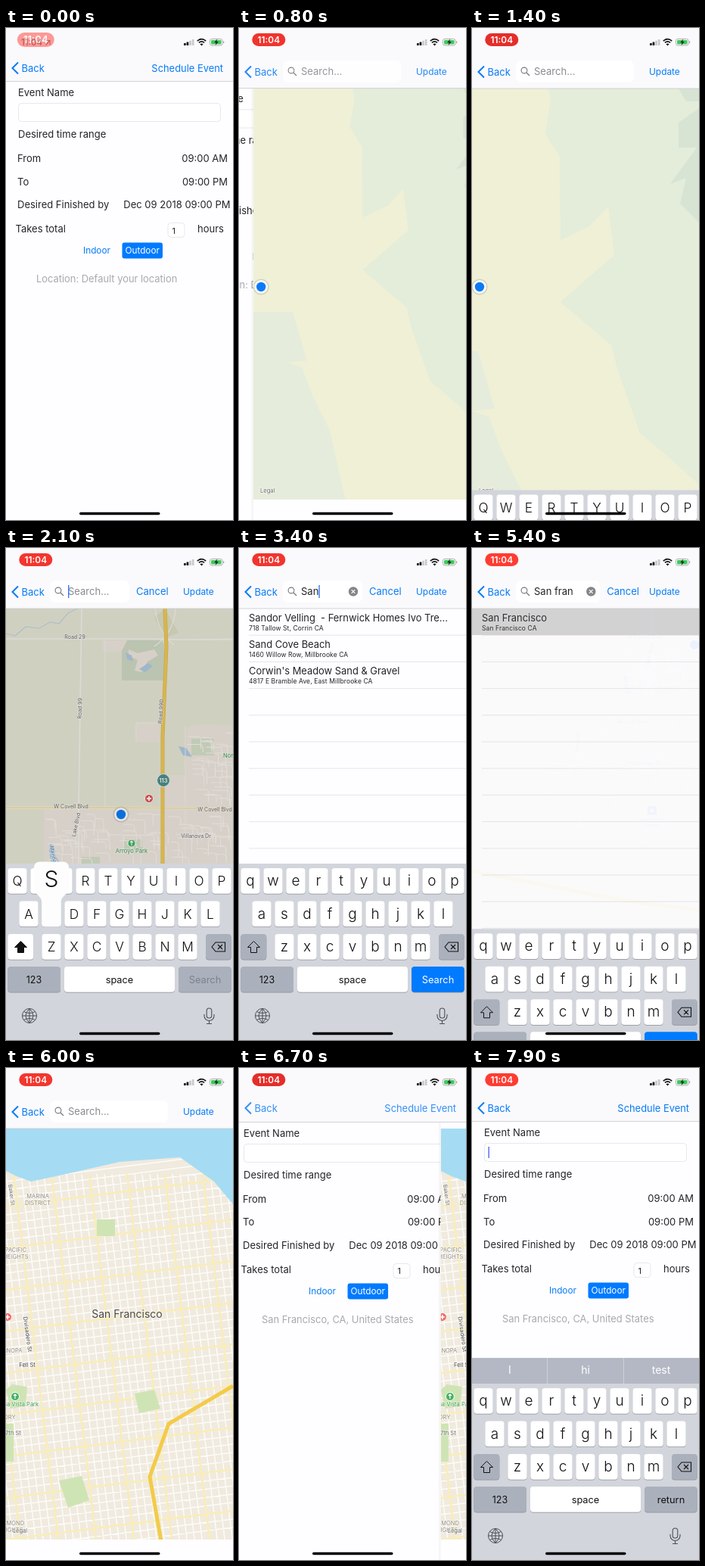
Animation of 300 by 650 pixels, one loop 8000 ms. Source, as an HTML page:

```html
<!DOCTYPE html>
<html lang="en">
<head>
<meta charset="utf-8">
<title>Schedule event</title>
<style>
  html, body { margin: 0; width: 100%; height: 100%; overflow: hidden; background: #fff; }
  svg { display: block; width: 300px; height: 650px; }
  text { font-family: Inter, Roboto, sans-serif; white-space: pre; }
</style>
</head>
<body>
<svg id="stage" viewBox="0 0 300 650" xmlns="http://www.w3.org/2000/svg"></svg>
<script>
const LOOP = 8000, STEP = 100;
const BLUE = '#087cf5', INK = '#242426';

// ---- markup helpers ----
const text = (x, y, s, size = 13, fill = INK, more = '') =>
  `<text x="${x}" y="${y}" font-size="${size}" fill="${fill}" ${more}>${s}</text>`;
const rect = (x, y, w, h, fill, r = 0, more = '') =>
  `<rect x="${x}" y="${y}" width="${w}" height="${h}" fill="${fill}" rx="${r}" ${more}/>`;
const line = (d, stroke, w = 1, more = '') =>
  `<path d="${d}" fill="none" stroke="${stroke}" stroke-width="${w}" ${more}/>`;
const area = (d, fill) => `<path d="${d}" fill="${fill}"/>`;
const disc = (x, y, r, fill, more = '') => `<circle cx="${x}" cy="${y}" r="${r}" fill="${fill}" ${more}/>`;
const group = (id, body, more = '') => `<g id="${id}" ${more}>${body}</g>`;
const END = 'text-anchor="end"', MID = 'text-anchor="middle"';
const label = (x, y, s, size = 7, turn = 0, fill = '#6d6a68') =>
  text(0, 0, s, size, fill, `${MID} stroke="#fff" stroke-opacity=".6" stroke-width="1.5" paint-order="stroke" transform="translate(${x} ${y}) rotate(${turn})"`);

function seeded(n) {
  return () => (n = (n * 16807) % 2147483647) / 2147483647;
}

// ---- form ----
function formMarkup() {
  const box = (x, y, w, h) => rect(x, y, w, h, '#fff', 4, 'stroke="#e8e7ec"');
  return rect(-20, -20, 420, 690, '#fefdff') +
    text(16, 90, 'Event Name') + box(16.5, 99.5, 267, 24) +
    rect(21.5, 104, 1.4, 15, '#4a6fe0', 0, 'id="fieldCaret"') +
    text(16, 145, 'Desired time range') +
    text(15, 177, 'From') + text(293, 177, '09:00 AM', 13, INK, END) +
    text(15, 207.5, 'To') + text(293, 207.5, '09:00 PM', 13, INK, END) +
    text(15, 238, 'Desired Finished by') + text(296.5, 238, 'Dec 09 2018 09:00 PM', 13, INK, END) +
    text(12.5, 270, 'Takes total') + box(214, 257.5, 22, 19) +
    text(219.5, 271.5, '1', 11) + text(253, 270, 'hours') +
    text(102, 298, 'Indoor', 11.8, BLUE) + rect(153.5, 283.5, 53.5, 21, '#007aff', 3) +
    text(180.2, 298, 'Outdoor', 11.8, '#fff', MID) +
    text(40, 336, '', 12.9, '#a9a9ad', 'id="place"');
}

// ---- maps ----
function plainMap() {
  return rect(-300, -100, 900, 1000, '#eff0d6') +
    area('M101 80L104 95L97 140L116 170L117 280L155 262L180 236L188 300L117 362L185 420L192 450L222 535L246 555L300 603L500 720V40H101Z', '#e4ecda') +
    area('M273 80L283 97H500V40H273ZM300 106L273 125V158H297L262 206L283 198L275 232L300 257H500V106Z', '#d8e4d3') +
    area('M-200 427H8L30 503L0 506L22 513L40 560L66 612L90 720H-200Z', '#e6ecdc');
}

function townStreets(seed, n, x, y, w, h) {
  const rnd = seeded(seed);
  let d = '';
  for (let i = 0; i < n; i++) {
    const a = x + rnd() * w, b = y + rnd() * h, u = 6 + rnd() * 14, v = 5 + rnd() * 12;
    d += `M${a.toFixed(1)} ${b.toFixed(1)}h${u.toFixed(1)}q4 0 4 4v${v.toFixed(1)}`;
  }
  return line(d, '#faf6f1', 1);
}

function fieldsMap() {
  const town = '#efe7df', road = '#f6f4ee';
  const highway = 'M210 -400V80L212 130L207 250V700';
  return rect(-700, -500, 1700, 1700, '#e8e7d7') +
    area('M128 122H166V137H128ZM172 231H203V256H172ZM240 237L262 233L300 235V417H50V345H203V300H237Z', town) +
    rect(-60, 430, 230, 190, town) +
    area('M153 136L160 122H206L209 128V175H153Z', '#d0dac4') +
    area('M196 92L210 80L228 112L210 119Z', '#dcdfc4') +
    area('M162 134l12 5l22 -5l5 8l-14 8l-8 14l-9 -2l4 -14l-12 -6z', town) +
    area('M158 138l8 4l2 8l-8 -3zM176 160l12 -8l6 4l-10 8zM228 262l10 2l8 12l-12 -2zM58 390l5 4l3 14l6 9h-12l-3 -16z', '#b0cce2') +
    area('M245 252h30v22h-30zM155 385h25v14h-25zM100 408h24v9h-24z', '#d7e1c9') +
    townStreets(77, 50, 52, 350, 145, 62) + townStreets(31, 28, 215, 350, 70, 60) +
    townStreets(9, 34, 239, 243, 52, 90) + townStreets(5, 40, -55, 435, 200, 170) +
    line('M-60 116L0 113L12 116L26 104L44 106L58 98L70 100L82 86L95 80', '#bfd5e2', 1.2) +
    line('M-300 120H195L230 121L600 119M100 80L96 345V417', road, 1.6) +
    line('M131 120V345M172 256V231H203M237 235V417', road, 0.8) +
    line('M-300 343H110L600 346', '#faf3d6', 3.4) + line('M-300 343H110L600 346', '#f0e3b4', 1.8) +
    line('M197 80Q201 112 222 128M224 80Q222 112 196 130', road, 1.2) +
    line(highway, '#dcb950', 5) + line(highway, '#f2cb55', 3.6) +
    line('M-300 620L60 690L300 720', '#f3cb48', 5) +
    label(91, 120, 'Road 29') + label(100, 212, 'Road 99', 7, -88) + label(207, 216, 'Road 99D', 7, -86) +
    label(86, 344, 'W Covell Blvd') + label(276, 348, 'W Covell Blvd') +
    label(95, 366, 'Lake Blvd', 7, -78) + label(251, 383, 'Villanova Dr') +
    label(60, 405, 'Marina', 7, 78, '#4c86b8') + label(297, 277, 'North', 7.5, 0, '#3c9a49') +
    label(166, 403, 'Arroyo Park', 7.6, 0, '#3c9a49') +
    label(70, 456, 'Russell Blvd') + label(87, 511, 'Hutchison Dr') + label(0, 480, 'Road 98', 7, -88) +
    disc(166, 390, 5, '#45b263', 'stroke="#fff"') + line('M166 393v-5M164 389l2 -2l2 2', '#fff', 1.2) +
    disc(189, 331, 5.5, '#e5544f', 'stroke="#fff"') + line('M186 331h6M189 328v6', '#fff', 1.8) +
    disc(208, 307, 8.5, '#4f8f8a', 'stroke="#e4efe8" stroke-width="1.2"') +
    text(208, 309.8, '113', 7.5, '#fff', MID + ' font-weight="600"') +
    rect(90, 565, 12, 12, '#5b8fe8', 3) + line('M93 571h6M96 568v6', '#fff', 1.4) +
    label(96, 585, 'University', 7, 0, '#4a78c8') + label(96, 593, 'Airport', 7, 0, '#4a78c8');
}

function cityMap() {
  let minor = '', major = '';
  for (let i = -4; i < 32; i++) minor += `M${i * 10 - 20} 140l60 490`;
  for (let i = 0; i < 46; i++) minor += `M0 ${150 + i * 11}l300 -38`;
  for (let i = 0; i < 7; i++) major += `M${i * 50 - 40} 140l60 490`;
  for (let i = 0; i < 9; i++) major += `M0 ${183 + i * 55}l300 -38`;
  return rect(0, 80, 300, 545, '#f0eadf') +
    line(minor, '#fdfcf8', 1.5) + line(major, '#f9edb8', 2.6) +
    area('M0 425L8 418L28 421L26 447L6 450ZM0 470H10V520H0ZM120 200h24v22h-24zM170 430l26 -5l8 25l-28 6zM70 545l30 -6l10 32l-28 10z', '#cfe4b4') +
    line('M300 420L215 470L190 540L205 625', '#f3cb48', 5) +
    area('M0 80H300V180L275 150L230 118L150 124L80 140L33 150L14 143L0 136Z', '#a5dcf3') +
    label(5, 168, 'Baker St', 7, 82) +
    label(42, 172, 'MARINA', 7.5, 0, '#918d86') + label(42, 181, 'DISTRICT', 7.5, 0, '#918d86') +
    label(13, 243, 'PACIFIC', 7.5, 0, '#918d86') + label(13, 252, 'HEIGHTS', 7.5, 0, '#918d86') +
    label(11, 376, 'NOPA', 7.5, 0, '#918d86') + label(28, 395, 'Fell St', 7.5, 0, '#4a4845') +
    label(26, 352, 'Divisadero St', 7.5, 82, '#4a4845') + label(13, 447, 'Buena Vista Park', 7.5, 0, '#3c9a49') +
    label(2, 464, 'CORY', 7.5, 0, '#918d86') + label(8, 485, '17th St', 7.5) +
    label(6, 604, 'DIAMOND', 7.5, 0, '#918d86') + label(6, 613, 'HEIGHTS', 7.5, 0, '#918d86') +
    label(160, 330, 'San Francisco', 14, 0, '#4a4845') +
    disc(2, 329, 5, '#ec6a66') + line('M-1 329h6M2 326v6', '#fff', 1.6) +
    disc(12, 434, 5.5, '#45b263', 'stroke="#fff"') + line('M12 437v-5M10 433l2 -2l2 2', '#fff', 1.2);
}

// ---- search results ----
const RESULTS = {
  none: [],
  start: [['Sacramento', 'Sacramento CA'], ['San Francisco', 'San Francisco CA'], ['Santa Cruz', 'Santa Cruz CA']],
  san: [
    ['Sandor Velling\u00a0 - Fernwick Homes Ivo Tre...', '718 Tallow St, Corrin CA'],
    ['Sand Cove Beach', '1460 Willow Row, Millbrooke CA'],
    ["Corwin's Meadow Sand &amp; Gravel", '4817 E Bramble Ave, East Millbrooke CA']
  ],
  city: [['San Francisco', 'San Francisco CA']]
};
const ROW = 35.2;
const rowsMarkup = key => RESULTS[key].map(([a, b], i) =>
  text(13, 97 + i * ROW, a, 12.9) + text(13, 108.6 + i * ROW, b, 8.5, INK, 'letter-spacing=".1"')).join('');

function tableMarkup() {
  let d = '';
  for (let i = 1; i < 17; i++) d += `M13 ${80 + i * ROW}H300`;
  return rect(0, 80, 300, 570, '#fefdff') + line(d, '#e0dfe3', 0.8) +
    rect(0, 80, 300, 35, '#d3d2d5', 0, 'id="rowTap"') + group('rows', '');
}

// ---- keyboard ----
const KEYS = ['qwertyuiop', 'asdfghjkl', 'zxcvbnm'];
const KEY_X = [15, 30, 60], KEY_Y = [423, 466.5, 510];
const keyAt = c => {
  const r = KEYS.findIndex(k => k.includes(c));
  return [KEY_X[r] + 30 * KEYS[r].indexOf(c), KEY_Y[r]];
};
const cap = (x, y, w, fill, id = '') =>
  rect(x, y + 0.8, w, 33.8, '#8c9097', 4) + rect(x, y, w, 33.8, fill, 4, id && `id="${id}"`);

function keyboardMarkup() {
  const gray = '#abb1bc';
  let s = rect(0, 417, 300, 300, '#d2d5db');
  s += group('hints', rect(0, 383, 300, 34, '#b4b8c4') + line('M99.5 383v34M200.5 383v34', '#cfd2d9') +
    ['I', 'hi', 'test'].map((w, i) => text(50 + 100 * i, 404, w, 14, '#fff', MID)).join(''));
  for (const c of KEYS.join('')) {
    const [x, y] = keyAt(c);
    s += cap(x - 12.7, y, 25.4, '#fff') + text(x, y + 23, c, 18.5, '#111', `${MID} class="letter" font-weight="300"`);
  }
  s += cap(2.3, 510, 34, gray, 'shift') + '<path id="arrow" d="M19.5 519.5l8 8h-4v7h-8v-7h-4z" stroke="#111" stroke-linejoin="round"/>';
  s += cap(264, 510, 33.7, gray) + line('M272 527l5 -6h12.5v12h-12.5zM280 524l6 6M286 524l-6 6', '#111', 1.1);
  s += cap(2.3, 553, 69.7, gray) + text(37, 575, '123', 12.5, '#111', MID);
  s += cap(77, 553, 146, '#fff', 'space') + text(150, 574.5, 'space', 12.8, '#111', MID);
  s += cap(228, 553, 69.7, gray, 'enter') + text(263, 574.5, 'Search', 12.8, '#111', `${MID} id="enterText"`);
  s += line('M21.5 618a9.5 9.5 0 1 0 19 0a9.5 9.5 0 1 0 -19 0zh19M31 608.5v19M31 608.5q-10 9.5 0 19q10 -9.5 0 -19M23.5 612.5q7.5 4 15 0M23.5 623.5q7.5 -4 15 0', '#4c4f55', 1);
  s += rect(265.2, 608, 6.6, 13, 'none', 3.3, 'stroke="#4c4f55" stroke-width="1.1"') +
    line('M262 616v2a6.5 6.5 0 0 0 13 0v-2M268.5 624.5v4M265 628.5h7', '#4c4f55', 1.1);
  return s + group('bubble',
    area('M-15 -52H15Q23 -52 23 -44V-18C23 -8 12.7 -8 12.7 2V30Q12.7 34 9 34H-9Q-12.7 34 -12.7 30V2C-12.7 -8 -23 -8 -23 -18V-44Q-23 -52 -15 -52Z', '#fdfdfe') +
    text(0, -19, '', 30, '#111', `${MID} id="bubbleText" font-weight="300"`));
}

// ---- bars ----
const chevron = y => line(`M16 ${y - 7.5}L8.5 ${y}L16 ${y + 7.5}`, BLUE, 2) + text(20.5, y + 4.7, 'Back', 13, BLUE);

function navMarkup() {
  return rect(0, 0, 300, 80, '#faf9fc', 0, 'id="navBg"') + rect(0, 0, 300, 0.8, '#c9c8cc', 0, 'id="navLine"') +
    group('navForm', chevron(53) + text(287, 57.7, 'Schedule Event', 12.9, BLUE, END)) +
    group('navMap', chevron(58) + rect(58, 43, 156, 29, '#fff', 7, 'id="field"') +
      disc(69, 56, 3.9, 'none', 'stroke="#77777c" stroke-width="1.1"') + line('M72 59L76 63', '#77777c', 1.2) +
      text(82, 62.3, '', 13, INK, 'id="query"') + rect(82, 49, 1.4, 17, '#3478f6', 0, 'id="caret"') +
      group('clear', disc(0, 57.5, 6.2, '#85858a') + line('M-2.3 55.2l4.6 4.6M2.3 55.2l-4.6 4.6', '#fff', 1.2)) +
      text(172, 62.3, 'Cancel', 13, BLUE, 'id="cancel"') + text(234, 62.2, 'Update', 11.9, BLUE));
}

function statusMarkup() {
  const bars = [3, 4.5, 6.3, 8].map((h, i) => rect(235 + i * 3.6, 23 - h, 2.7, h, i < 2 ? '#111' : '#c9c9cc', 0.6)).join('');
  return text(20, 23, '11:04 \u2197', 11.5, '#444', 'id="oldClock" font-weight="500"') +
    group('pill', rect(-22, -8.5, 44, 17, '#ff3b32', 8.5, 'id="pillBg"') +
      text(0, 4.2, '11:04', 11.8, '#fff', `${MID} font-weight="600"`)) + bars +
    line('M252.8 17.2q5.7 -5 11.4 0M254.9 19.4q3.6 -3 7.2 0', '#111', 1.7) + area('M256.4 21.2q2.1 -1.6 4.2 0l-2.1 2.3z', '#111') +
    rect(269.5, 14.5, 16.5, 8.5, '#fff', 2.4, 'stroke="#a5a5a8" stroke-width=".9"') +
    rect(271, 16, 13.5, 5.5, '#3ec95c', 1.2) + rect(287, 17.2, 1.2, 3, '#a5a5a8', 0.6) +
    area('M279.2 14.5l-4 4.8h2.4l-1 3.7l4.2 -4.9h-2.5z', '#222');
}

document.getElementById('stage').innerHTML =
  '<clipPath id="mapClip"><rect x="0" y="80" width="300" height="543"/></clipPath>' +
  group('form', formMarkup()) +
  group('page', rect(-3, 0, 3, 650, '#000', 0, 'opacity=".03"') + rect(0, 0, 300, 650, '#fefdff') +
    group('maps', group('plain', plainMap()) + group('fields', fieldsMap()) +
      group('dot', disc(0, 0, 10.5, '#777', 'opacity=".25"') + disc(0, 0, 9, '#fff') + disc(0, 0, 6.2, '#0b7bf5')) +
      group('city', cityMap()) + label(18.5, 614, 'Legal', 7.5), 'clip-path="url(#mapClip)"') +
    rect(0, 80, 300, 570, '#000', 0, 'id="dim"') + group('table', tableMarkup())) +
  navMarkup() + statusMarkup() + group('keyboard', keyboardMarkup()) +
  rect(97, 639.7, 106.5, 3.6, '#000', 1.8);

// ---- timing ----
const PRESSES = [
  ['S', 2000, 2200], ['a', 2700, 2900], ['n', 3000, 3200], [' ', 3500, 3700],
  ['f', 3800, 3900], ['r', 4000, 4100], ['a', 4200, 4300], ['n', 4400, 4500]
];
const ui = {};
document.querySelectorAll('[id]').forEach(e => ui[e.id] = e);
const letters = [...document.querySelectorAll('.letter')];

const part = (t, from, len) => Math.min(1, Math.max(0, (t - from) / len));
const ease = (t, from, len) => 1 - (1 - part(t, from, len)) ** 3;
const mix = (a, b, u) => a + (b - a) * u;
const set = (e, attrs) => { for (const k in attrs) e.setAttribute(k, attrs[k]); };
const move = (e, x, y, s = 1) => set(e, { transform: `translate(${x} ${y}) scale(${s})` });
const fade = (e, o) => set(e, { opacity: o, visibility: o > 0 ? 'inherit' : 'hidden' });
const say = (e, s) => { if (e.textContent !== s) e.textContent = s; };

function drawPages(t) {
  const p = t < 6000 ? ease(t, 500, 500) : 1 - ease(t, 6440, 500);
  move(ui.page, 300 * (1 - p), 0);
  fade(ui.page, +(p > 0));
  move(ui.form, -90 * p, 9 * p);
  const h = mix(70.5, 80, p);
  set(ui.navBg, { height: h });
  set(ui.navLine, { y: h - 0.4 });
  fade(ui.navForm, Math.max(0, 1 - 1.6 * p));
  fade(ui.navMap, Math.max(0, 1.6 * p - 0.6));
  say(ui.place, t < 6000 ? 'Location: Default your location' : 'San Francisco, CA, United States');
  fade(ui.fieldCaret, +(t >= 7400));
}

function drawMaps(t) {
  const zoom = ease(t, 1450, 350), far = part(t, 5400, 350);
  const s = mix(0.85, 1, ease(t, 900, 500)) + zoom;
  move(ui.plain, 300 * (1 - s), 80 * (1 - s), s);
  const jump = +(t >= 5000);
  const x = -142 * (1 - zoom) + jump * 142 + far * 300;
  const y = -10 * (1 - zoom) - jump * 224 - far * 250;
  move(ui.fields, x, y);
  fade(ui.fields, part(t, 1450, 200));
  move(ui.dot, 152 + x, 352 + y);
  fade(ui.city, part(t, 5550, 200));
  fade(ui.dim, 0.1 * part(t, 1400, 300) * (1 - part(t, 5350, 300)));
}

function drawSearch(t) {
  const open = t < 5000 ? ease(t, 1400, 350) : 1 - ease(t, 5385, 350);
  const right = mix(214, 163, open);
  const typed = t < 5700 ? PRESSES.filter(k => k[2] <= t).map(k => k[0]).join('') : '';
  set(ui.field, { width: right - 58 });
  set(ui.query, { fill: typed ? INK : '#8a8a90' });
  say(ui.query, typed || 'Search...');
  set(ui.caret, { x: 82 + (typed ? ui.query.getComputedTextLength() : 0) });
  fade(ui.caret, +(t >= 1500 && t < 5200));
  move(ui.clear, right - 12, 0);
  fade(ui.clear, +!!typed);
  set(ui.cancel, { x: right + 9 });
  fade(ui.cancel, Math.min(1, 1.2 * open));

  const key = t < 2400 ? 'none' : t < 3300 ? 'start' : t < 4300 ? 'san' : 'city';
  if (ui.rows.dataset.key !== key) {
    ui.rows.dataset.key = key;
    ui.rows.innerHTML = rowsMarkup(key);
  }
  fade(ui.table, t < 2200 ? 0 : 1 - part(t, 5380, 300));
  fade(ui.rowTap, +(t >= 5100));
  return typed;
}

function drawKeyboard(t, typed) {
  const hints = t >= 7000;
  const up = hints ? ease(t, 7350, 350) : t < 5000 ? ease(t, 1379, 350) : 1 - ease(t, 5350, 350);
  move(ui.keyboard, 0, (hints ? 267 : 233) * (1 - up));
  fade(ui.keyboard, +(up > 0));
  fade(ui.hints, +hints);

  const upper = !typed && t < 5000;
  letters.forEach(e => {
    const c = e.textContent;
    say(e, upper ? c.toUpperCase() : c.toLowerCase());
    set(e, { 'font-size': upper ? 17.3 : 19 });
  });
  set(ui.shift, { fill: upper ? '#fff' : '#abb1bc' });
  set(ui.arrow, { fill: upper ? '#111' : 'none' });
  const active = !hints && !upper;
  set(ui.enter, { fill: active ? '#007aff' : '#abb1bc' });
  set(ui.enterText, { fill: active ? '#fff' : hints ? '#111' : '#7d828b' });
  say(ui.enterText, hints ? 'return' : 'Search');

  const press = PRESSES.find(k => t >= k[1] && t < k[2]);
  const key = press && press[0];
  set(ui.space, { fill: key === ' ' ? '#abb1bc' : '#fff' });
  const popped = !!key && key !== ' ';
  fade(ui.bubble, +popped);
  if (popped) {
    move(ui.bubble, ...keyAt(key.toLowerCase()));
    say(ui.bubbleText, key);
  }
}

function drawStatus(t) {
  const u = part(t, 0, 300);
  move(ui.pill, 39.3, 15.5, mix(1.11, 1, u));
  fade(ui.pill, mix(0.5, 1, u));
  fade(ui.oldClock, 0.7 * (1 - u));
  const glow = 0.5 + 0.5 * Math.cos((t - 1400) / 2650 * 2 * Math.PI);
  set(ui.pillBg, { fill: `rgb(${255 - 27 * glow} ${60 - 14 * glow} ${50 - 8 * glow})` });
}

function draw(now) {
  const t = Math.floor(now % LOOP / STEP) * STEP;
  drawPages(t);
  drawMaps(t);
  drawKeyboard(t, drawSearch(t));
  drawStatus(t);
}

function tick(now) {
  draw(now);
  requestAnimationFrame(tick);
}
draw(performance.now());
requestAnimationFrame(tick);
</script>
</body>
</html>
```
